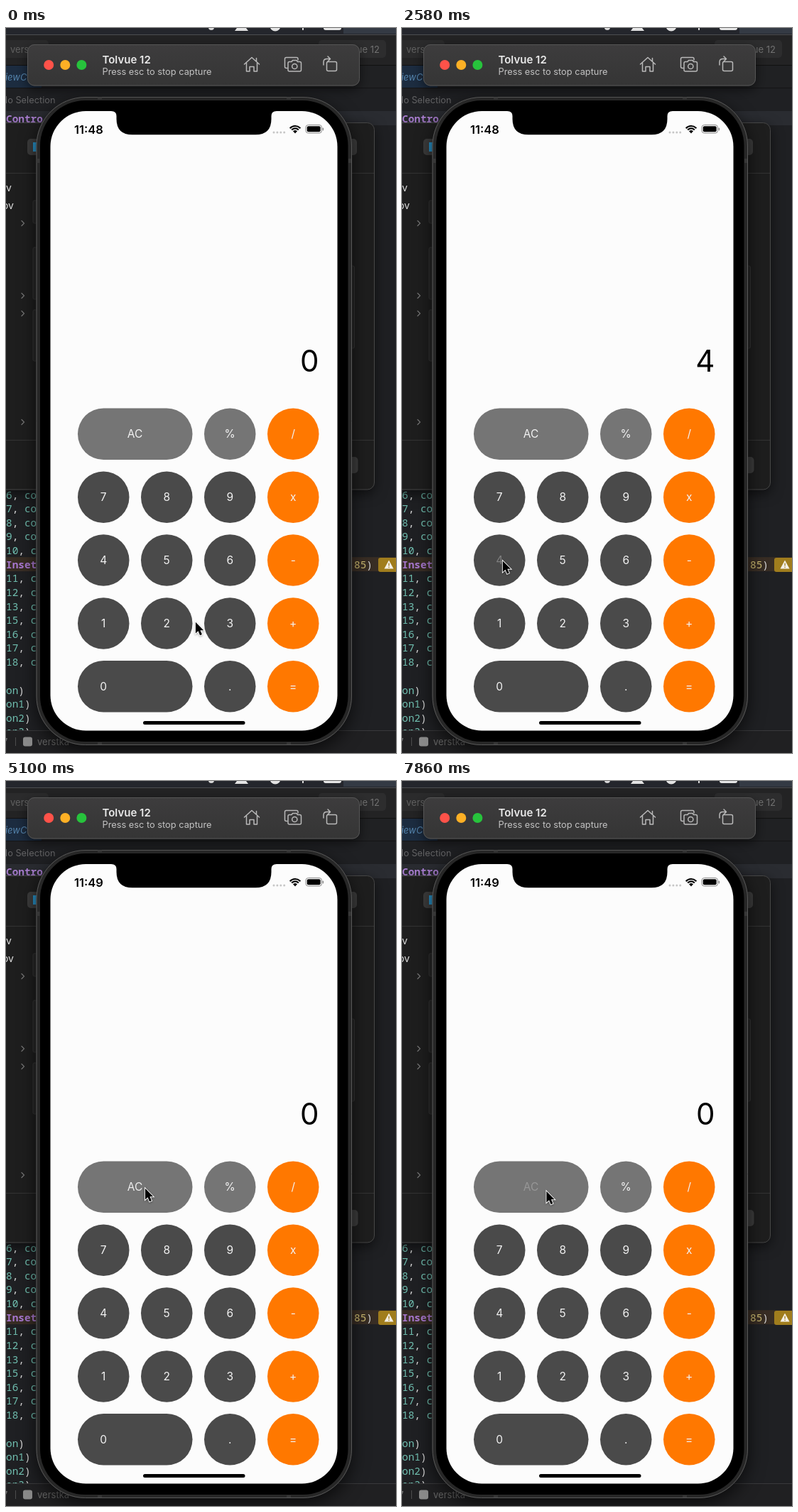
Animation of 549 by 1021 pixels, one loop 7.89 s. Source, as an HTML page with a canvas:

```html
<!DOCTYPE html>
<html lang="en">
<head>
<meta charset="utf-8">
<title>Calculator</title>
<style>
html, body { margin: 0; width: 100%; height: 100%; overflow: hidden; background: #1e1f22; }
canvas { display: block; width: 549px; height: 1021px; }
</style>
</head>
<body>
<canvas id="stage"></canvas>
<script>
const W = 549, H = 1021, LOOP = 7890, TICK = 30;
const HOLD = 90, REST = 130, FADE = 220;
const SANS = 'Inter, "Noto Sans", sans-serif';
const MONO = '"Noto Sans Mono", "DejaVu Sans Mono", monospace';
const dpr = window.devicePixelRatio || 1;

const view = document.getElementById("stage");
const back = document.createElement("canvas");
for (const c of [view, back]) {
  c.width = W * dpr;
  c.height = H * dpr;
}
let g = back.getContext("2d");

// press time, cursor tip, key, display after release
const steps = [
  [60, 266, 835, ""],
  [690, 144, 639, "7", "7"],
  [960, 402, 655, "x", "7"],
  [1290, 140, 652, "7", "7"],
  [1600, 394.5, 923, "=", "49"],
  [1930, 404, 833, "+", "49"],
  [2440, 140, 748, "4", "4"],
  [2880, 398, 925, "=", "53"],
  [3240, 404.5, 831, "+", "53"],
  [3640, 225, 655, "8", "8"],
  [4060, 398, 925, "=", "61"],
  [4800, 195, 572, "AC", "0"],
  [5000, 195, 572, ""],
  [5360, 228, 655, "8", "8"],
  [5640, 315, 925, ".", "8."],
  [5950, 223, 746, "5", "8.5"],
  [6600, 402, 746, "-", "8.5"],
  [6950, 224, 835, "2", "2"],
  [7270, 398, 925, "=", "6.5"],
  [7730, 202.5, 576, "AC", "0"]
].map(([at, x, y, key, out]) => ({ at, x, y, key, out }));

const keys = [];
["A%/", "789x", "456-", "123+", "0.="].forEach((row, r) => {
  const wide = row.length === 3;
  [...row].forEach((ch, c) => {
    const col = wide && c ? c + 1 : c;
    const big = wide && !c;
    keys.push({
      name: ch === "A" ? "AC" : ch,
      x: 101 + col * 89, y: 535.5 + r * 88.9, w: big ? 161.5 : 72.5,
      tx: ch === "A" ? 181.5 : 137.2 + col * 89,
      fill: col === 3 ? "#ff7800" : r ? "#4a4a4a" : "#757575"
    });
  });
});

function rect(x, y, w, h, fill) {
  g.fillStyle = fill;
  g.fillRect(x, y, w, h);
}

function box(x, y, w, h, r, fill, line, width = 1) {
  g.beginPath();
  g.roundRect(x, y, w, h, r);
  if (fill) { g.fillStyle = fill; g.fill(); }
  if (line) { g.strokeStyle = line; g.lineWidth = width; g.stroke(); }
}

function dot(x, y, r, fill) {
  g.beginPath();
  g.arc(x, y, r, 0, 7);
  g.fillStyle = fill;
  g.fill();
}

function ring(x, y, r, color, width) {
  g.beginPath();
  g.arc(x, y, r, 0, 7);
  g.strokeStyle = color;
  g.lineWidth = width;
  g.stroke();
}

function text(s, x, y, font, fill, align = "left") {
  g.font = font;
  g.fillStyle = fill;
  g.textAlign = align;
  g.fillText(s, x, y);
}

function path(d, color, width) {
  g.strokeStyle = color;
  g.lineWidth = width;
  g.lineCap = g.lineJoin = "round";
  g.stroke(new Path2D(d));
}

function shade(blur, dy, alpha) {
  g.shadowColor = `rgba(0,0,0,${alpha})`;
  g.shadowBlur = blur * dpr;
  g.shadowOffsetY = dy * dpr;
}

function drawEditor() {
  rect(0, 0, W, H, "#1f2023");
  rect(0, 0, W, 9, "#24262c");
  rect(475, 0, 74, 8, "#343a44");
  rect(0, 9, W, 1, "#4c4d50");
  dot(289, -1, 4, "#d8d8d8");
  g.fillStyle = "#e4e4e4";
  g.fill(new Path2D("M325 0h13l3 4h-19z"));
  dot(379, -3, 7.5, "#e4e4e4");
  rect(417, 0, 2, 3, "#d8d8d8");
  box(447, -8, 25, 11, 3, "#e4e4e4");

  rect(0, 10, W, 42, "#232324");
  box(-10, 17, 70, 25, 5, "#2b2b2c");
  box(440, 17, 95, 25, 5, "#2d2d2e");
  text("verstka", 6, 35, `13px ${SANS}`, "#606060");
  text("Tolvue 12", 526, 35, `13px ${SANS}`, "#717171", "right");
  rect(0, 52, W, 32, "#202123");
  rect(0, 53, 50, 31, "#1c2c40");
  rect(0, 52, W, 1, "#111");
  text("ViewController", -10, 74, `italic 13px ${SANS}`, "#5484ad");
  rect(0, 84, W, 1, "#141416");
  text("No Selection", -7.5, 105.5, `12.8px ${SANS}`, "#626264");
  rect(0, 117, W, 20, "#2a2c31");
  text("Contro", 0, 133, `bold 14.4px ${MONO}`, "#b083d8");

  const mono = `500 14.4px ${MONO}`;
  [6, 7, 8, 9, 10, 0, 11, 12, 13, 15, 16, 17, 18].forEach((n, i) => {
    const y = 662.5 + i * 19.63, s = String(n), w = s.length * 8.65;
    if (!n) {
      rect(0, y - 15.5, W, 20, "#382d24");
      text("Inset", 0, y, `bold 14.4px ${MONO}`, "#a878d0");
      return;
    }
    text(s, 0, y, mono, "#70bfb0");
    text(",", w, y, mono, "#d8d8d8");
    text("co", w + 17.3, y, mono, "#70bfb0");
  });
  ["", "1", "2", "3"].forEach((n, i) => {
    const y = 937.5 + i * 19.6;
    text("on" + n, 0, y, mono, "#70bfb0");
    text(")", 17.3 + n.length * 8.65, y, mono, "#d8d8d8");
  });
  text("85", 490, 761, mono, "#cfbd72");
  text(")", 507.3, 761, mono, "#d8d8d8");
  box(524, 746, 30, 20, 3, "#a07d1d");
  g.fillStyle = "#f4f0e6";
  g.fill(new Path2D("M539 749.5l6.5 12h-13z"));
  rect(538.4, 753.5, 1.3, 4, "#a07d1d");
  rect(538.4, 758.7, 1.3, 1.4, "#a07d1d");

  rect(0, 990, W, 31, "#202022");
  rect(0, 989, W, 1, "#39393b");
  text("7", -5, 1009.5, `13px ${SANS}`, "#777");
  rect(13, 999, 1, 12, "#4c4c4c");
  box(24, 998.5, 13, 13, 3, "#898989");
  text("verstka", 44, 1010, `13px ${SANS}`, "#666");
}

function drawSheet() {
  shade(18, 5, .6);
  box(-20, 133, 538.5, 517, 10, "#1e1e1e");
  shade(0, 0, 0);
  box(-20, 133.5, 538.5, 516.5, 10, null, "#474747");
  rect(0, 204, 518, 1, "#343434");
  rect(0, 580, 518, 1, "#343434");
  box(30, 156, 464, 23, 5, "#3c3c3c");
  rect(38, 161, 9, 13, "#278fc4");
  text("v", 0, 229.5, `14px ${SANS}`, "#dedede");
  text("ov", -5, 254.5, `14px ${SANS}`, "#dedede");
  for (const y of [275, 377, 402, 555]) path(`M22 ${y - 3.5}l3.5 3.5l-3.5 3.5`, "#747474", 1.2);
  box(430, 604, 65.5, 23, 5, "#3d3d3d");
}

function drawPhone() {
  for (const [y, h] of [[243, 32], [309, 73], [397, 72]])
    box(38, y, 10, h, 2, "#262626", "#343434");
  box(480, 335, 10.5, 116, 2, "#262626", "#343434");

  shade(24, 8, .65);
  box(42.5, 97, 444.5, 913, 69, "#272727");
  shade(0, 0, 0);
  box(43, 97.5, 443.5, 912, 68.5, null, "#585858");
  box(48, 102, 433.5, 903, 64, "#000");
  for (const y of [97.5, 1006]) {
    rect(129, y, 6, 3, "#373737");
    rect(395, y, 6, 3, "#373737");
  }
  rect(43.5, 184, 4, 6, "#373737");
  rect(482, 184, 4, 6, "#373737");
  box(62.5, 117, 404, 872.5, 50, "#fcfcfc");

  g.fillStyle = "#000";
  g.fill(new Path2D("M148 116H381V117Q373.5 117 373.5 124V128Q373.5 150.3 351 150.3H178Q155.5 150.3 155.5 128V124Q155.5 117 148 117Z"));

  for (let i = 0; i < 4; i++) dot(377 + i * 4.9, 147, 1.5, "#c6c6c6");
  g.lineCap = "butt";
  [8.8, 5.4].forEach(r => {
    g.beginPath();
    g.arc(407, 148, r + 1.2, -Math.PI * .76, -Math.PI * .24);
    g.strokeStyle = "#000";
    g.lineWidth = 2.2;
    g.stroke();
  });
  g.fillStyle = "#000";
  g.fill(new Path2D("M407 148.5l-3-3.2q3-2.6 6 0z"));
  box(422, 136.5, 22.5, 11.5, 3.5, null, "#8a8a8a");
  box(423.7, 138.2, 19, 8.1, 2, "#000");
  box(445.7, 140.5, 1.4, 4, .7, "#8a8a8a");

  for (const k of keys) box(k.x, k.y, k.w, 72.5, 36.25, k.fill);
  box(193, 976, 143.5, 5, 2.5, "#000");
}

function drawBar() {
  const fill = g.createLinearGradient(0, 23, 0, 82);
  fill.addColorStop(0, "#3d3c3d");
  fill.addColorStop(1, "#353535");
  shade(16, 5, .55);
  box(30, 23, 468, 58.5, 10, fill);
  shade(0, 0, 0);
  box(30.5, 23.5, 467, 57.5, 9.5, null, "#565656");
  dot(60.2, 52, 7, "#ff5249");
  dot(83.3, 52, 7, "#fdb025");
  dot(106.4, 52, 7, "#27c33c");
  text("Tolvue 12", 135.5, 50, `600 15px ${SANS}`, "#e9e9e9");
  text("Press esc to stop capture", 135.5, 66, `12.8px ${SANS}`, "#c3c3c3");

  const ink = "#b9b9b9";
  path("M335.5 51L346 41.5L356.5 51M338.5 49V61H343V54.5H349V61H353.5V49M352.5 46.5V42.5", ink, 1.5);
  path("M396 56.5H394.5Q392.5 56.5 392.5 54.5V43.5Q392.5 41.5 394.5 41.5H409Q411 41.5 411 43.5V45", ink, 1.5);
  path("M399 47.5H402L403.5 45.5H409L410.5 47.5H413.5Q415.5 47.5 415.5 49.5V59Q415.5 61 413.5 61H399Q397 61 397 59V49.5Q397 47.5 399 47.5Z", ink, 1.5);
  ring(406.3, 54, 3.6, ink, 1.5);
  box(451.5, 47.5, 14, 13, 2, null, ink, 1.5);
  path("M447 52V48Q447 43.5 451.5 43.5H456M453 40L456.5 43.5L453 47", ink, 1.5);
}

function cursorAt(t) {
  const i = steps.findLastIndex(s => t >= s.at);
  if (i < 0) return steps[0];
  const a = steps[i], b = steps[i + 1] || a;
  const from = a.at + REST, span = b.at - 20 - from;
  const u = span > 0 ? Math.min(1, Math.max(0, (t - from) / span)) : 0;
  const e = u * u * (3 - 2 * u);
  return { x: a.x + (b.x - a.x) * e, y: a.y + (b.y - a.y) * e };
}

function labelAlpha(name, t) {
  const s = steps.findLast(p => p.key === name && t >= p.at);
  if (!s) return 1;
  const u = Math.min(1, Math.max(0, (t - s.at - HOLD) / FADE));
  return .12 + .88 * u;
}

function drawCursor(x, y, down) {
  if (down) {
    ring(x + 1, y + 3.5, 24.7, "#000", 2);
    ring(x + 1, y + 3.5, 23.2, "#fff", 1.2);
  }
  g.save();
  g.translate(x + .9, y + 1.8);
  g.scale(.92, .92);
  const arrow = new Path2D("M0 0V17.2L4 13.5L6.7 20L9.8 18.7L7.1 12.4H12.3Z");
  shade(3, 1, .35);
  g.lineJoin = "miter";
  g.strokeStyle = "#fff";
  g.lineWidth = 2;
  g.stroke(arrow);
  shade(0, 0, 0);
  g.fillStyle = "#000";
  g.fill(arrow);
  g.restore();
}

function render(t) {
  g.setTransform(1, 0, 0, 1, 0, 0);
  g.drawImage(back, 0, 0);
  g.scale(dpr, dpr);
  text(t < 4300 ? "11:48" : "11:49", 96, 148.5, `600 16.5px ${SANS}`, "#000");

  const last = steps.findLast(s => s.key && t >= s.at + HOLD);
  text(last ? last.out : "0", 440.5, 483.5, `42px ${SANS}`, "#000", "right");

  for (const k of keys) {
    g.globalAlpha = labelAlpha(k.name, t);
    text(k.name, k.tx, k.y + 41.8, `15.5px ${SANS}`, "#f2f2f2", "center");
  }
  g.globalAlpha = 1;

  const p = cursorAt(t);
  drawCursor(p.x, p.y, steps.some(s => s.key && t >= s.at && t < s.at + HOLD));
}

g.scale(dpr, dpr);
drawEditor();
drawSheet();
drawPhone();
drawBar();
g = view.getContext("2d");

const start = performance.now();
function loop() {
  const t = (performance.now() - start) % LOOP;
  render(Math.floor(t / TICK) * TICK);
  requestAnimationFrame(loop);
}
loop();
</script>
</body>
</html>
```
